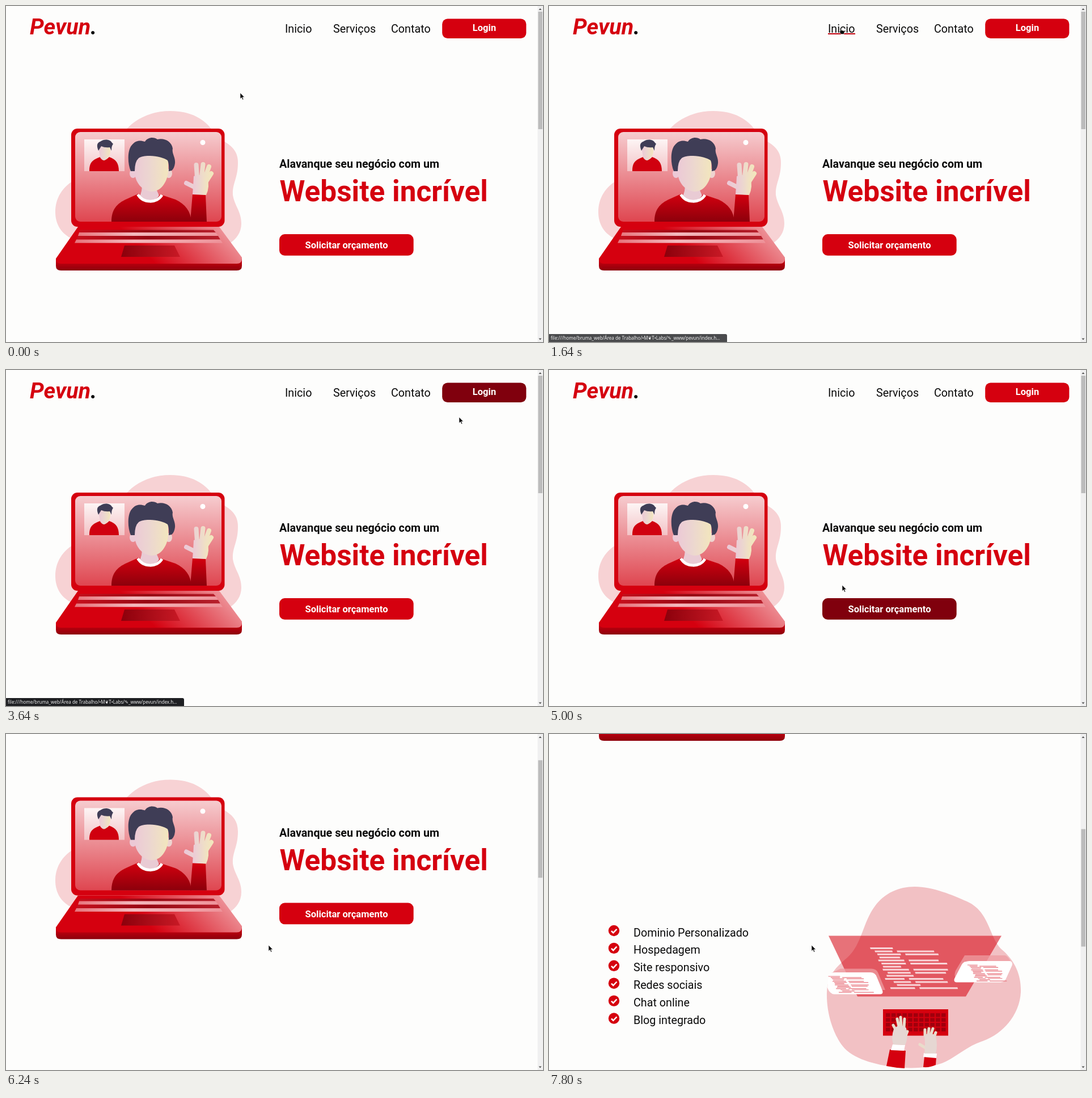
Write an HTML page that moves like this. It is 947 px wide and 592 px high and loops after 8 s.

```html
<!DOCTYPE html>
<html lang="pt">
<head>
<meta charset="utf-8">
<title>Landing page</title>
<style>
html, body { margin: 0; width: 100%; height: 100%; overflow: hidden; background: #fdfdfc; }
svg { display: block; width: 100%; height: 100%; }
text { font-family: Roboto, sans-serif; font-size: 19.73px; fill: #0a0a0a; }
.bold { font-weight: 700; }
.btn { font-weight: 700; font-size: 16.57px; fill: #fff; text-anchor: middle; }
.logo { font: italic 700 39.46px Roboto, sans-serif; fill: #d5000f; }
.title { font-weight: 700; font-size: 51.3px; fill: #d5000f; }
.status { font-family: "Noto Sans", "DejaVu Sans", sans-serif; font-size: 8px; fill: #eee; }
</style>
</head>
<body>
<svg viewBox="0 0 947 592" preserveAspectRatio="none">
  <defs>
    <linearGradient id="screen" x1="0" y1="0" x2="0" y2="1"><stop stop-color="#f6cccf"/><stop offset="1" stop-color="#df4650"/></linearGradient>
    <linearGradient id="preview" x1="0" y1="0" x2="0" y2="1"><stop stop-color="#fdf5f5"/><stop offset="1" stop-color="#f3c3c6"/></linearGradient>
    <linearGradient id="skin"><stop stop-color="#ecc9d6"/><stop offset=".45" stop-color="#ecd6d0"/><stop offset="1" stop-color="#f2e6bd"/></linearGradient>
    <linearGradient id="shirt" x1="0" y1="0" x2="0" y2="1"><stop stop-color="#d5000f"/><stop offset="1" stop-color="#8c000b"/></linearGradient>
    <linearGradient id="deck" gradientUnits="userSpaceOnUse" x1="270" y1="460" x2="370" y2="360"><stop stop-color="#d5000f"/><stop offset="1" stop-color="#f0a3a8"/></linearGradient>
    <linearGradient id="stripe"><stop stop-color="#e7737b"/><stop offset=".4" stop-color="#f3b9bd"/><stop offset="1" stop-color="#ee9299"/></linearGradient>
    <linearGradient id="slot"><stop stop-color="#c5101d"/><stop offset=".5" stop-color="#960813"/><stop offset="1" stop-color="#b8202c"/></linearGradient>
    <linearGradient id="pad"><stop stop-color="#8c000b"/><stop offset="1" stop-color="#c81925"/></linearGradient>
    <g id="code"></g>
  </defs>
  <rect width="947" height="592" fill="#fdfdfc"/>
  <g id="page">
    <text class="logo" x="42" y="50">Pevun<tspan fill="#0a0a0a">.</tspan></text>
    <g id="nav"></g>
    <rect id="login" x="769.200" y="22.400" width="148.200" height="34.600" rx="9.500"/>
    <text class="btn" x="843.500" y="44">Login</text>

    <path fill="#f7d2d4" d="M205 226C225 198 257 185 290 185C326 185 351 199 366 222C374 240 409 240 409 276C409 304 399 312 400 333C403 352 415 362 415 383C415 400 406 410 394 419L120 412C97 402 87 384 87 363C87 338 100 318 122 306Z"/>
    <rect x="115" y="216" width="270.500" height="173" rx="11" fill="#d5000f"/>
    <rect x="122" y="222" width="258" height="158" rx="9" fill="url(#screen)"/>
    <circle cx="347" cy="240.500" r="4.500" fill="#fff"/>
    <rect x="138" y="235" width="71" height="56" fill="url(#preview)"/>
    <g>
      <path fill="#d0000f" d="M147 291C147 276 152 271 166 266Q173 276 182 266C194 270 199 277 199 291Z"/>
      <path fill="url(#skin)" d="M165 248Q174 243 183 248L184 256Q183 265 179 267Q173 277 166 267Q165 259 164 256Z"/>
      <path fill="#3f3d56" d="M163 255C159 245 161 241 166 239C174 233 184 235 187 241L189 243Q186 246 186 255L183 249Q174 250 168 247Z"/>
    </g>
    <g>
      <path fill="url(#shirt)" d="M186 380C186 359 195 348 213 340L233 331L275 333L299 341C316 349 326 362 327 380Z"/>
      <path fill="#e9cbd4" d="M240 312L263 318L270 334C263 346 244 346 236 333Q240 329 240 312Z"/>
      <path d="M232.500 332C242 348 266 348 275 333" fill="none" stroke="#fff" stroke-width="5"/>
      <ellipse cx="224" cy="295" rx="6" ry="8" fill="#ecc9d6"/>
      <ellipse cx="287" cy="295" rx="6" ry="8" fill="#eed4d0"/>
      <path fill="url(#skin)" d="M226 270C238 257 275 257 286 272L286 292C284 312 272 327 257 327C240 326 228 311 227 294Z"/>
      <path fill="#3f3d56" d="M220 291C214 277 214 253 222 245C228 237 236 236 245 239C250 230 262 231 267 235C280 232 292 239 294 251C292 260 299 266 298 277Q297 286 292 290L287 291Q288 279 285 272C276 265 245 260 234 268Q227 274 227 291Z"/>
      <path fill="url(#shirt)" d="M329 331L352 333L354 380L325 380Z"/>
      <path fill="none" stroke="url(#skin)" stroke-width="8" stroke-linecap="round" d="M337 302L335.500 280M345 300L347.500 279M351 302L358 283M353 309L362 295M334 320L318 312"/>
      <path fill="url(#skin)" d="M331 300Q343 294 355 304Q360 318 353 333L329 332Q330 320 331 300Z"/>
    </g>
    <path fill="url(#deck)" d="M127 389H376L416 443V458H88V445Z"/>
    <path fill="url(#slot)" d="M131 394.500H366L370 399H129ZM127 405H374L378 411.500H124Z"/>
    <path fill="url(#stripe)" d="M129 399H370L374 405H127ZM124 411.500H378L382 417.500H121Z"/>
    <path fill="url(#pad)" d="M209 422H297L307 442H203Z"/>
    <path fill="url(#shirt)" d="M88 446Q89 454 97 454H407Q416 454 416 445V458Q416 466 407 466H97Q88 466 88 458Z"/>

    <text class="bold" x="482" y="285">Alavanque seu negócio com um</text>
    <text class="title" x="482.500" y="344">Website incrível</text>
    <rect id="quote" x="482" y="402.100" width="236.700" height="37.700" rx="9.500"/>
    <text class="btn" x="600.500" y="427">Solicitar orçamento</text>

    <g transform="translate(0 454)">
      <g id="list"></g>
      <path fill="#f2c1c4" d="M645 269C677 269 712 284 737 295C779 314 775 360 800 381C824 402 833 428 832 455C830 493 803 527 765 541C738 550 722 566 700 577C675 589 640 590 612 587C575 583 535 572 518 550C500 527 489 490 490 455C491 425 507 410 526 394C552 371 553 332 575 303C592 280 617 269 645 269Z"/>
      <path fill="#d5000f" opacity=".55" d="M493 355.500H798L735 462.500H544Z"/>
      <use href="#code" fill="#f9d5d8"/>
      <path fill="#ee9ca2" opacity=".75" d="M514 413.500H568Q577 413.500 580 420L593 451H588L570 421L498 421Z"/>
      <path fill="#fff" d="M493 424Q497 420 504 420H567Q575 420 578 428L588 452Q590 458.500 584 458.500H503Q495 458 491 447Z"/>
      <use href="#code" fill="#e8757e" transform="translate(198 276) scale(.52 .4)"/>
      <path fill="#ee9ca2" opacity=".75" d="M733 390H804Q808 390 814 400H735L717 430Q714 424 717 417Z"/>
      <path fill="#fff" d="M741 400H813Q819 402 816 409L806 431Q803 437.500 796 437.500H719Q713 437 715 431L728 406Q731 400 741 400Z"/>
      <use href="#code" fill="#e8757e" transform="translate(483 256) scale(.45 .4)"/>
      <rect x="589" y="485" width="115" height="46.500" fill="#d5000f"/>
      <g id="keys" fill="#a0000c"></g>
      <path fill="#d5000f" d="M601 556L629 558L627 589Q610 588 595 585ZM662 569L683 569L682 583Q672 588 660 587Z"/>
      <path fill="#fff" d="M606 547L628 548L626 558L603 557ZM661 562L684 563L683 571L660 569Z"/>
      <path fill="none" stroke="#e9dccb" stroke-width="5" stroke-linecap="round" d="M612 522L607 513M617 515L614 502M621 515L620 499M626 517L627 502M628 534L632 524M663 531L663 521M669 528L670 519M674 528L677 519M679 534L682 526M664 553L654 547"/>
      <path fill="#e6d7d2" d="M608 520Q618 508 630 518Q634 536 628 548L607 547Q603 534 608 520ZM662 531Q672 523 682 532Q686 549 682 563H662Q664 545 662 531Z"/>
    </g>
  </g>
  <g id="status">
    <path fill="#1e1f22" d="M0 578H311Q314 578 314 581V592H0Z"/>
    <text class="status" x="3" y="588">file:///home/bruma_web/Área de Trabalho/•M❦T•Labs/✎_www/pevun/index.h…</text>
  </g>
  <rect x="937.500" width="9.500" height="592" fill="#f0f0f0"/>
  <path fill="#555" d="M939.500 7H944.500L942 4ZM939.500 585.500H944.500L942 588.500Z"/>
  <rect id="bar" x="938.500" y="10" width="7.500" height="207" fill="#bcbcbc"/>
  <g id="cursor" fill="#0a0a0a" stroke="#fff" stroke-width=".6">
    <path id="arrow" d="M0 0V10.500L2.500 8.300L4.200 12.300L5.900 11.500L4.200 7.700H7.500Z"/>
    <path id="hand" d="M1 1Q2 0 3 1V4.500L8 5.500Q9 6 9 8L8 11.500H3L0 7.500Q0 6 1.500 6.500Z"/>
  </g>
</svg>
<script>
const LOOP = 8000, RED = [213, 0, 15], DARK = [128, 0, 13];
const $ = id => document.getElementById(id);
const clamp = v => Math.max(0, Math.min(1, v));
const mix = (a, b, k) => a + (b - a) * k;
const smooth = k => k * k * (3 - 2 * k);
const repeat = (n, fn) => Array.from({ length: n }, (_, i) => fn(i)).join("");
const show = (el, on) => el.setAttribute("visibility", on ? "visible" : "hidden");

const links = [["Inicio", 492, 540], ["Serviços", 577, 652], ["Contato", 679, 748]];
$("nav").innerHTML = links.map(([name, a, b]) =>
  `<text x="${a}" y="47">${name}</text>
   <rect x="${a}" y="48" width="${b - a}" height="2" fill="#c0000e"/>`).join("");
const underlines = $("nav").querySelectorAll("rect");

const features = ["Dominio Personalizado", "Hospedagem", "Site responsivo",
  "Redes sociais", "Chat online", "Blog integrado"];
$("list").innerHTML = features.map((name, i) => `<g transform="translate(0 ${346.5 + i * 30.9})">
  <circle cx="114.5" r="9.7" fill="#d5000f"/>
  <path d="M110 .5l3.3 3.3l6.2 -6.5" fill="none" stroke="#fff" stroke-width="2.5"/>
  <text x="149" y="10">${name}</text></g>`).join("");

// Lines of code lean right and break in two at random
let seed = 11;
const random = () => (seed = seed * 16807 % 2147483647) / 2147483647;
$("code").innerHTML = repeat(14, i => {
  const y = 376 + i * 5.4, x = 566 + i * 2.6 + random() * 18, w = 30 + random() * 22;
  const bar = (left, width) => `<path d="M${left} ${y}h${width}l1 3h${-width}z"/>`;
  return bar(x, w) + (i % 3 ? bar(x + w + 8, 50 + random() * 18) : "");
});

$("keys").innerHTML = repeat(44, i =>
  `<rect x="${594 + i % 11 * 9.8}" y="${492 + Math.floor(i / 11) * 8.5}" width="7.5" height="6.5"/>`);

// Key points: time, then values
const pointer = [[0, 413, 153], [1640, 512, 38], [2280, 612, 41], [2760, 712, 41], [3320, 815, 42],
  [3640, 799, 83], [4500, 560, 420], [5000, 517, 379], [5600, 463, 372]];
const scroll = [[5700, 0], [6200, 104.5], [7200, 246], [7800, 454]];

function at(points, t, ease = k => k) {
  const next = points.findIndex(p => p[0] > t);
  const b = points.at(next), a = next > 0 ? points[next - 1] : b;
  const k = a === b ? 0 : ease((t - a[0]) / (b[0] - a[0]));
  return a.slice(1).map((v, i) => mix(v, b[i + 1], k));
}

const rates = [[4400, 200], [3320, 160], [2200, 80], [0, 40]];
function hold(t) {
  const [start, step] = rates.find(r => r[0] <= t);
  return t - (t - start) % step;
}

const pulse = (t, on, off, fade) => clamp((t - on) / fade) * (1 - clamp((t - off) / fade));
const shade = k => `rgb(${RED.map((c, i) => Math.round(mix(c, DARK[i], k)))})`;

function draw(time) {
  const t = hold(time);
  const [x, y] = at(pointer, t, smooth), [top] = at(scroll, t);
  const inside = (a, b, c, d) => x >= a && x <= b && y >= c && y <= d;
  const over = links.map(([, a, b]) => inside(a, b, 28, 52));
  const hover = over.includes(true) || inside(769, 917, 22, 57) || inside(482, 719, 402 - top, 440 - top);
  over.forEach((on, i) => show(underlines[i], on));
  show($("arrow"), !hover);
  show($("hand"), hover);
  $("login").setAttribute("fill", shade(pulse(t, 3080, 3640, 160)));
  $("quote").setAttribute("fill", shade(pulse(t, 4300, 5000, 200)));
  $("status").setAttribute("opacity", pulse(t, 1440, 3720, 250));
  $("page").setAttribute("transform", `translate(0 ${-top})`);
  $("bar").setAttribute("y", 10 + top * .347);
  $("cursor").setAttribute("transform", `translate(${x} ${y})`);
}

const begin = performance.now();
function tick() {
  draw((performance.now() - begin) % LOOP);
  requestAnimationFrame(tick);
}
tick();
</script>
</body>
</html>
```
